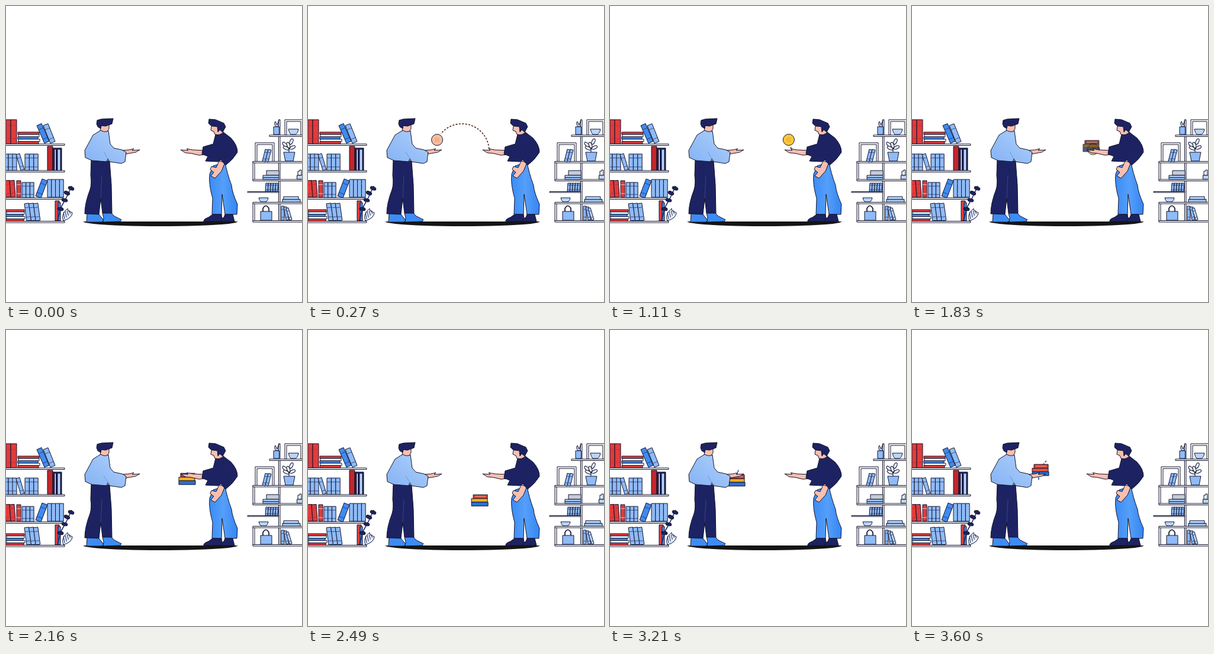
Write an HTML page that moves like this. It is 500 by 500 pixels and loops after 3.84 s.

```html
<!DOCTYPE html>
<html lang="en">
<head>
<meta charset="utf-8">
<title>Book exchange</title>
<style>
html, body { margin: 0; width: 100%; height: 100%; overflow: hidden; background: #fff; }
svg { display: block; width: 500px; height: 500px; }
.ink { stroke: #10132c; stroke-width: 1; stroke-linejoin: round; }
.skin { fill: #f9bfb0; }
.navy { fill: #1d2362; }
.dash { fill: none; stroke-width: 1.6; }
</style>
</head>
<body>
<svg viewBox="0 0 500 500">
  <defs>
    <linearGradient id="shirt" x1="0" y1="1" x2="1" y2="0">
      <stop offset="0" stop-color="#83b2f4"/><stop offset="1" stop-color="#b0d0fb"/>
    </linearGradient>
    <linearGradient id="jeans">
      <stop offset="0" stop-color="#3c8cf6"/><stop offset=".5" stop-color="#559ffa"/><stop offset="1" stop-color="#3585f2"/>
    </linearGradient>
  </defs>

  <g id="left" class="ink"></g>
  <g id="right" class="ink"></g>

  <path fill="#151515" d="M130 364H392L388 366L376 368Q330 372 260 372Q190 372 148 368L134 366Z"/>

  <path id="coinTrail" class="dash" stroke="#54291c" stroke-dasharray="3 2.4"/>
  <path id="bookTrail" class="dash" stroke-dasharray="4 2.4"/>

  <g id="coin">
    <circle class="ink" r="9.5"/>
    <rect x="-4" y="-4" width="8" height="8" fill="#d9822b" opacity=".22"/>
  </g>
  <g id="books" class="ink">
    <rect id="top" x="-11" y="-9.5" width="24" height="6.5"/>
    <path d="M-8-6.5H10" stroke="#f5a08e"/>
    <rect id="mid" x="-14" y="-3" width="27" height="6"/>
    <rect id="low" x="-14" y="3" width="28" height="6.5"/>
  </g>

  <g class="ink">
    <path class="skin" d="M160 202L159 212Q166 216 172 211L174 207L174 200Z"/>
    <path class="navy" d="M154 193L161 191L181 190L179 199L168 203L161 202L160 207L155 204L153 199Z"/>
    <path class="skin" d="M195 244L208 243L216 241L213 244L226 243L219 247L208 249L197 251Z"/>
    <path class="navy" d="M144 259L175 262L178 302L179 351L163 350L160 325L157 352L133 351Q133 333 142 310Q145 300 143 286Z"/>
    <path d="M162 286L160 325" fill="none" stroke="#3a4288"/>
    <path fill="#3d8cf5" d="M137 351L157 352L166 363L161 365H136Z"/>
    <path fill="#3d8cf5" d="M163 350H178L183 355L195 361L193 364L164 365L165 358Z"/>
    <path fill="url(#shirt)" d="M160 210Q166 214 173 211L176 233L182 240L196 243L203 247L201 263L195 266L175 263L172 258L170 263L145 261L134 256L133 244L147 218Z"/>
    <path d="M172 258L165 246" fill="none" stroke="#5e8cd2" stroke-width=".7"/>
  </g>

  <g class="ink">
    <path class="skin" d="M347 203L346 210L351 212L353 217L361 221L367 214L365 203Z"/>
    <path class="navy" d="M343 191L354 192L368 198L371 204L366 213L361 209L358 213L357 204L346 202L342 198Z"/>
    <path class="skin" d="M295 243L308 244L305 241L315 243L336 244L336 251L326 252L313 249L303 248Z"/>
    <path fill="url(#jeans)" d="M350 270L370 264Q373 281 381 303Q382 315 391 335L390 352H370L365 318L364 352H348L349 325Q342 300 344 284Z"/>
    <path class="skin" d="M360 262L370 264L364 279L353 291L346 287L351 281L345 276L347 271L355 273Z"/>
    <path class="navy" d="M349 352H364L366 364H334Q333 360 342 357Z"/>
    <path class="navy" d="M370 352H383L386 364H363Q362 360 368 357Z"/>
    <path class="navy" d="M354 217Q362 219 367 213L380 223Q391 235 391 247Q384 259 371 269L363 260L358 263L337 262L341 254L331 250L333 238L350 233Z"/>
  </g>
</svg>
<script>
const RED = '#e23b3b', DEEP = '#c4262b', BLUE = '#3f8bf0', SKY = '#8fbbf6', PALE = '#b9d4fb', NAVY = '#1d2362', WHITE = '#fff';
const $ = id => document.getElementById(id);
let layer;

function add(tag, attrs) {
  const el = document.createElementNS('http://www.w3.org/2000/svg', tag);
  for (const k in attrs) el.setAttribute(k, attrs[k]);
  return layer.appendChild(el);
}
const box = (x, y, w, h, fill) => add('rect', { x, y, width: w, height: h, fill });
const shape = (d, fill = 'none', more) => add('path', { d, fill, ...more });

// A book whose spine leans from its foot (x, y) by dx over height h.
function book(x, y, w, h, fill, dx = 0, band = NAVY) {
  const tilt = dx * w / h;
  shape(`M${x} ${y}l${dx} ${-h}l${w} ${tilt}l${-dx} ${h}Z`, fill);
  for (const k of [.22, .76])
    shape(`M${x + dx * k} ${y - h * k}l${w} ${tilt}`, 'none', { stroke: band, 'stroke-width': .7 });
}
const row = (x, y, n, w, h, fill, dx, band) => {
  for (let i = 0; i < n; i++) book(x + i * w, y, w, h, fill, dx, band);
};
const pile = (x, y, w, colors, h) => colors.forEach((c, i) => box(x + i % 2, y + i * h, w - i % 3, h, c));
const plank = (x, y, w, h = 2.5) => box(x, y, w, h, WHITE);

function leftShelf() {
  layer = $('left');
  book(0, 233, 8, 41, RED, 0, DEEP);
  book(8, 233, 10, 41, RED, 0, DEEP);
  pile(20, 213, 36, [RED, WHITE, BLUE, WHITE, RED], 4);
  book(65, 232, 8, 30, BLUE, -13);
  book(75, 232, 8, 30, SKY, -12);

  row(-4, 278, 2, 8, 28, SKY);
  book(11, 278, 7, 28, SKY);
  book(25, 278, 6, 27, SKY, -8);
  row(32, 278, 3, 7.4, 28, SKY);
  box(70, 237, 9, 41, DEEP);
  box(79, 240, 15, 38, NAVY);
  box(82, 242, 2.5, 36, WHITE);
  box(87, 242, 5, 36, PALE);

  row(0, 323, 2, 8, 28, RED, -2, DEEP);
  book(18, 323, 7, 28, RED, 0, WHITE);
  row(27, 324, 3, 6.7, 26, SKY);
  book(50, 321, 9, 29, BLUE, 11);
  row(70, 323, 4, 6.8, 30, SKY, 0, SKY);

  pile(0, 344, 31, [RED, WHITE, BLUE, WHITE, RED], 3.9);
  row(35, 363, 3, 7.6, 29, SKY, -4);
  box(83, 329, 7, 34, RED);
  box(88, 332, 4, 31, BLUE);

  for (const [y, w] of [[233, 99], [278, 99], [324, 97], [363.5, 99]]) plank(-2, y, w + 2);

  shape('M111 304Q103 323 93 340L87 362', 'none', { stroke: NAVY, 'stroke-width': 1.5 });
  for (const [x, y, r] of [[110, 308, 20], [99, 328, 15], [103, 316, 25], [92, 343, 10]])
    add('ellipse', { cx: x, cy: y, rx: 5, ry: 2.7, fill: NAVY, transform: `rotate(${r} ${x} ${y})` });
  shape('M97 363Q92 352 104 342L105 346L112 349Q112 358 97 363Z', '#e4edfc');
  for (let i = 0; i < 4; i++) shape(`M${97 + i * 3.2} ${348 - i}l2 ${12 - i * 2}`, 'none', { stroke: NAVY });
}

function rightShelf() {
  layer = $('right');
  shape('M471 218V192H501V218H498V195H474V218Z', WHITE);
  shape('M421 263V231H453V263H450V234H424V263Z', WHITE);
  box(460.5, 192, 2.5, 172, WHITE);
  box(417, 263, 3, 31, WHITE);
  box(417, 333, 3, 31, WHITE);
  plank(445, 218, 60);
  plank(417, 262.5, 90);
  plank(417, 293, 90);
  plank(408, 313.5, 53, 1.5);
  plank(417, 331.5, 90);
  plank(417, 362.5, 90);

  shape('M456 204Q452 198 455 195L458 201L461 192L460 204Z', PALE);
  box(452, 204, 9.5, 13, SKY);
  shape('M477 208H494Q493 215 489 217H481Q478 214 477 208Z', PALE);

  row(433, 262, 2, 5, 20, SKY, 5);
  shape('M478 247Q477 237 482 225M478 245Q473 238 468 235M479 241L485 237');
  for (const [x, y, r] of [[482, 229, -65], [471, 234, 45], [473, 240, 25], [484, 239, -25], [477, 235, 70]])
    add('ellipse', { cx: x, cy: y, rx: 5, ry: 2.5, fill: '#e7effd', transform: `rotate(${r} ${x} ${y})` });
  shape('M469 247H488L485 262H472Z', SKY);

  box(440, 278, 21, 8, '#c4ccda');
  box(434, 286, 27, 3.5, PALE);
  box(434, 289.5, 27, 3.5, SKY);
  shape('M493 286V279H496V277H499V286Z', '#e7effd');
  box(491.5, 286, 9, 6.5, PALE);
  row(438, 313, 5, 4.2, 14, SKY, 1);
  shape('M427 324H443Q442 330 438 331H431Q428 329 427 324Z', PALE);
  box(469, 322, 25, 4.5, PALE);
  box(467, 326.5, 30, 5, SKY);

  shape('M434 348V342Q439 333 444 342V348', 'none', { 'stroke-width': 1.7 });
  box(430, 347, 19, 15, SKY);
  book(465, 362, 5, 24, SKY);
  book(473, 362, 5, 22, SKY, -4);
  book(479, 362, 4, 20, PALE, -6);
}

const LOOP = 3840, CX = 260, R = 46;
const clamp = (t, a, b) => Math.min(1, Math.max(0, (t - a) / (b - a)));
const sine = u => (1 - Math.cos(Math.PI * u)) / 2;
const mix = (a, b, u) => `rgb(${a.map((v, i) => Math.round(v + (b[i] - v) * u))})`;
const at = (deg, cy) => [CX + R * Math.cos(deg * Math.PI / 180), cy + R * Math.sin(deg * Math.PI / 180)];
const show = (id, alpha) => $(id).setAttribute('opacity', alpha);
const place = (id, p) => $(id).setAttribute('transform', `translate(${p})`);

// Drawn from the fixed end back to the traveller, so the dashes stay put.
function trail(id, end, tip, cy, sweep) {
  const left = sweep ? tip < end : tip > end;
  const d = `M${at(end, cy)}A${R} ${R} 0 0 ${sweep ? 0 : 1} ${at(tip, cy)}`;
  $(id).setAttribute('d', left ? d : '');
}

function draw(t) {
  const u = clamp(t, 0, 1350);
  const turn = 180 + 176 * (.4 * u + .6 * sine(u));
  const enter = clamp(t, 0, 180);
  trail('coinTrail', 355, turn + 15, 245, true);
  show('coinTrail', enter);
  place('coin', at(turn, 245));
  show('coin', enter * (1 - clamp(t, 1800, 2010)));
  $('coin').firstElementChild.setAttribute('fill', mix([246, 190, 164], [252, 201, 57], clamp(t, 600, 1050)));

  const on = t >= 1830;
  const angle = -21 + 222 * sine(clamp(t, 1830, 3570));
  trail('bookTrail', 180, Math.max(0, angle + 23), 253, false);
  show('bookTrail', on ? 1 : 0);
  $('bookTrail').setAttribute('stroke', mix([18, 34, 78], [24, 78, 160], clamp(t, 1830, 2200)));
  place('books', at(angle, 253));
  const lit = clamp(t, 1830, 2040);
  show('books', on ? .8 + .2 * lit : 0);
  $('top').setAttribute('fill', mix([96, 22, 10], [224, 58, 48], lit));
  $('mid').setAttribute('fill', t < 3000
    ? mix([112, 62, 8], [246, 172, 28], lit)
    : mix([246, 172, 28], [228, 78, 58], clamp(t, 3200, 3560)));
  $('low').setAttribute('fill', mix([34, 52, 96], [42, 112, 208], lit));
}

leftShelf();
rightShelf();
const start = performance.now();
function tick() {
  draw((performance.now() - start) % LOOP);
  requestAnimationFrame(tick);
}
tick();
</script>
</body>
</html>
```
